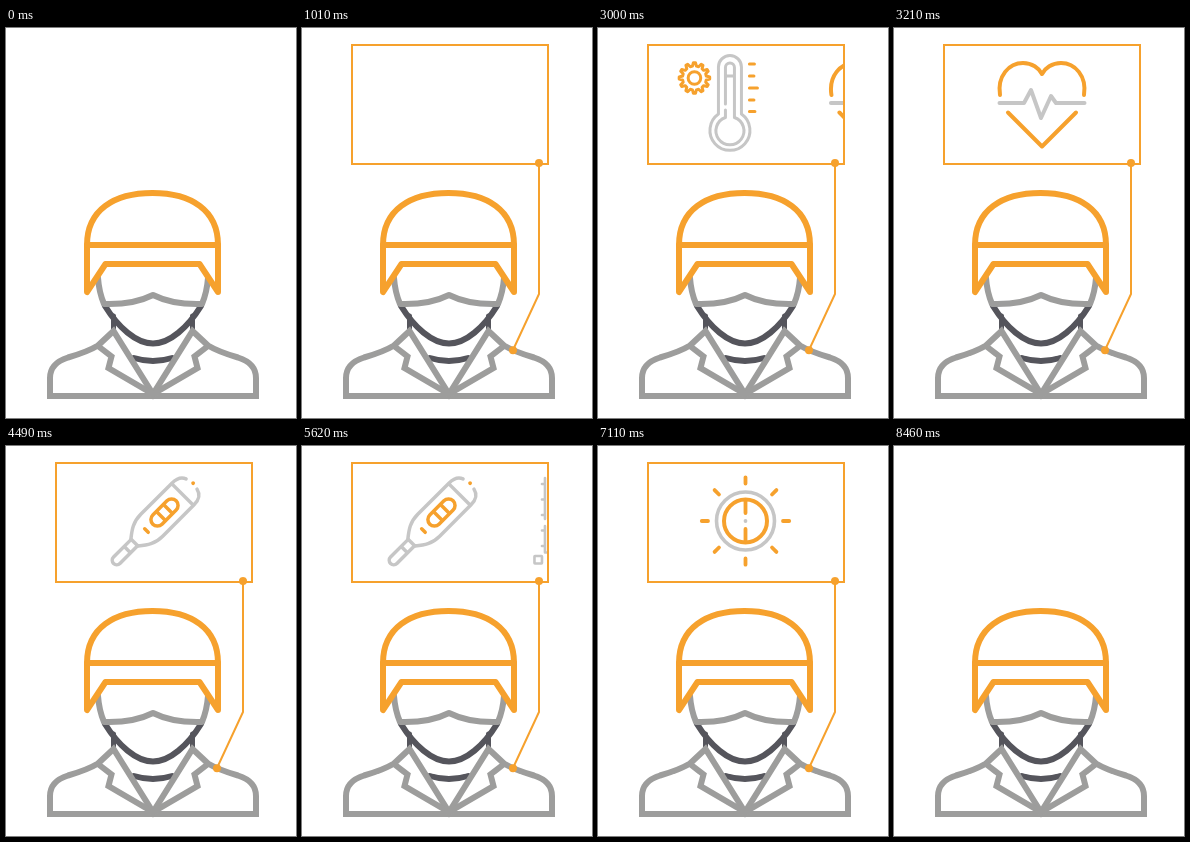
An HTML page for the animation above (8490 ms loop, 290 by 390 pixels).

```html
<!DOCTYPE html>
<html lang="en">
<head>
<meta charset="utf-8">
<title>Worker heat monitoring</title>
<style>
  html, body { margin: 0; width: 100%; height: 100%; overflow: hidden; background: #fff; }
  svg { display: block; width: 100vw; height: 100vh; }
  g, path, line, circle, rect { fill: none; stroke-linecap: round; stroke-linejoin: round; }
  .orange { stroke: #f6a12d; }
  .light { stroke: #c6c6c6; }
  .gray { stroke: #9d9d9c; }
  .dark { stroke: #55555c; }
  .dot { fill: #f6a12d; stroke: none; }
  .thin { stroke-width: 2; stroke-linecap: butt; stroke-linejoin: miter; }
</style>
</head>
<body>
<svg viewBox="0 0 290 390">
  <defs>
    <clipPath id="window"><rect x="51" y="18" width="194" height="117"/></clipPath>
  </defs>

  <g id="worker" stroke-width="6">
    <g class="dark" stroke-linecap="butt" style="stroke-linecap:butt">
      <path stroke-width="5" d="M107.5 288V304M186.5 288V304"/>
      <path d="M128 330Q147 336 166 330"/>
      <path d="M99 278C112 299 130 315.500 147 315.500S182 299 195 278"/>
    </g>
    <g class="gray">
      <path d="M92 250Q93 264 98 276Q127 277 147 267Q167 277 196 276Q201 264 202 250"/>
      <path style="stroke-linejoin:miter" d="M44 368V350C44 339 51 333 62 329.500C74 326 83 323 92 317.500L107.500 303L147 366L186.500 303L202 317.500C211 323 220 326 232 329.500C243 333 250 339 250 350V368Z"/>
      <path style="stroke-linejoin:miter" d="M92 318L105.500 328.500L102.500 340L147 366L191.500 340L188.500 328.500L202 318"/>
    </g>
    <g class="orange">
      <path fill="#fff" style="fill:#fff" d="M81 264V217C81 182 108 165 146.500 165S212 182 212 217V264L193.500 236H99.500Z"/>
      <path d="M81 217H212"/>
    </g>
  </g>

  <g id="callout">
    <path id="lead" class="orange thin" pathLength="1" d="M211 322L237 266V136"/>
    <path id="frame" class="orange thin" pathLength="1" d="M237 136H50V17H246V136H237"/>
    <circle class="dot" cx="211" cy="322.300" r="4"/>
    <circle id="joint" class="dot" cx="237" cy="135" r="4"/>

    <g clip-path="url(#window)" stroke-width="3">
      <g class="icon">
        <g transform="translate(16.5 0)">
          <path id="gear" class="orange"/>
          <circle class="orange" cx="96.500" cy="50" r="6.300"/>
          <g class="light">
            <path d="M120.500 86V39a11.500 11.500 0 0 1 23 0V86A20 20 0 1 1 120.500 86Z"/>
            <path d="M127.500 76V39.500a4.500 4.500 0 0 1 9 0V89.500A14 14 0 1 1 127.500 89.500V82M128 48H136"/>
          </g>
          <path class="orange" d="M151.500 36H156.500M151.500 48H156M151.500 60H159.500M151.500 72H156M151.500 83.500H157"/>
        </g>
      </g>

      <g class="icon">
        <path class="orange" stroke-width="4" d="M106 67C103 48 115 35 129 35C138 35 145 40 148 46C151 40 158 35 167 35C181 35 193 48 190 67M114 84.500L148 118.500L182 84.500"/>
        <path class="light" stroke-width="4" d="M105.500 75H130L137 62L147 90L157 68L162 75H190.500"/>
      </g>

      <g class="icon">
        <g transform="translate(150 75) rotate(-45)">
          <g class="light" stroke-width="3.500">
            <path d="M51 -8.500C49 -14 44 -15.500 38 -15.500H-6C-17 -15.500 -23 -11 -30.500 -5V5C-23 11 -17 15.500 -6 15.500H38C46 15.500 50 13 51.500 6.500"/>
            <path d="M37.500 -15V15M-30.500 -4.500H-55.500a4.500 4.500 0 0 0 0 9H-30.500M-40.500 -4V4"/>
          </g>
          <rect class="orange" stroke-width="3.500" x="-4.500" y="-6.500" width="33" height="13" rx="6.500"/>
          <path class="orange" stroke-width="3.500" d="M7 -6V6M17 -6V6M-13.500 -2.500V2.500"/>
          <circle class="dot" cx="53" cy="-.5" r="1.900"/>
        </g>
      </g>

      <g class="icon">
        <g class="light" stroke-width="2.600">
          <path d="M162 38H125V100H187V38H168M125 53.500H187M125 69H187M125 84.500H187M140.500 38V100M156 38V100M171.500 38V100"/>
          <path d="M118 32V73M118 80V106.500H191M115 38H118M115 53.500H118M115 69H118M115 84.500H118M115 100H118"/>
          <rect x="107.500" y="110" width="7.500" height="7.500" rx=".5"/>
        </g>
        <path class="orange" stroke-width="3.600" d="M140.500 98C143 82 150 75 163 69C177 63 184 55 187.500 38"/>
        <circle class="dot" cx="140.500" cy="98.300" r="5.300"/>
        <circle class="dot" cx="187.700" cy="38" r="5.300"/>
      </g>

      <g class="icon">
        <circle class="light" stroke-width="3.600" cx="147.500" cy="75" r="29"/>
        <circle class="orange" stroke-width="4" cx="147.500" cy="75" r="21.500"/>
        <path class="orange" stroke-width="3.800" d="M147.500 55V67M147.500 83V95"/>
        <circle cx="147.500" cy="75" r="1.900" style="fill:#c6c6c6"/>
        <path id="rays" class="orange" stroke-width="3.800"/>
      </g>
    </g>
  </g>
</svg>

<script>
  const LOOP = 8490, STEP = 30, PITCH = 144;
  // start time and number of steps of each slide
  const SLIDES = [[1770, 11], [3000, 8], [4280, 8], [5620, 7], [6960, 6]];

  const byId = id => document.getElementById(id);
  const icons = [...document.querySelectorAll('.icon')];
  const clamp = v => Math.min(1, Math.max(0, v));
  const progress = (t, start, steps) => clamp((Math.floor((t - start) / STEP) + 1) / steps);
  const polar = (cx, cy, r, a) =>
    (cx + r * Math.cos(a)).toFixed(2) + ' ' + (cy + r * Math.sin(a)).toFixed(2);

  function buildGear() {
    const teeth = 12, turn = 2 * Math.PI / teeth, points = [];
    for (let i = 0; i < teeth; i++) {
      for (const [r, a] of [[12, -.32], [15.3, -.13], [15.3, .13], [12, .32]]) {
        points.push(polar(96.5, 50, r, (i + a) * turn));
      }
    }
    byId('gear').setAttribute('d', 'M' + points.join('L') + 'Z');
  }

  function buildRays() {
    let d = '';
    for (let i = 0; i < 8; i++) {
      const a = i * Math.PI / 4;
      d += 'M' + polar(147.5, 75, 37.5, a) + 'L' + polar(147.5, 75, 43.7, a);
    }
    byId('rays').setAttribute('d', d);
  }

  function trace(id, p) {
    const path = byId(id);
    path.style.display = p > 0 ? '' : 'none';
    path.setAttribute('stroke-dasharray', p < 1 ? p + ' 2' : 'none');
  }

  function render(t) {
    const drawn = progress(t, 200, 28);
    byId('callout').style.display = drawn > 0 ? '' : 'none';
    byId('callout').setAttribute('opacity', 1 - progress(t, 8310, 6));
    trace('lead', clamp(drawn / .4));
    trace('frame', clamp((drawn - .4) / .6));
    byId('joint').style.display = drawn >= .4 ? '' : 'none';

    let pos = -1;
    for (const [start, steps] of SLIDES) pos += progress(t, start, steps) ** 1.04;
    icons.forEach((icon, i) => {
      const away = i - pos;
      icon.style.display = Math.abs(away) < 1 ? '' : 'none';
      icon.setAttribute('transform', `translate(${(away * PITCH).toFixed(2)} 0)`);
    });
  }

  buildGear();
  buildRays();
  const begin = performance.now();
  function tick() {
    render((performance.now() - begin) % LOOP);
    requestAnimationFrame(tick);
  }
  tick();
</script>
</body>
</html>
```
